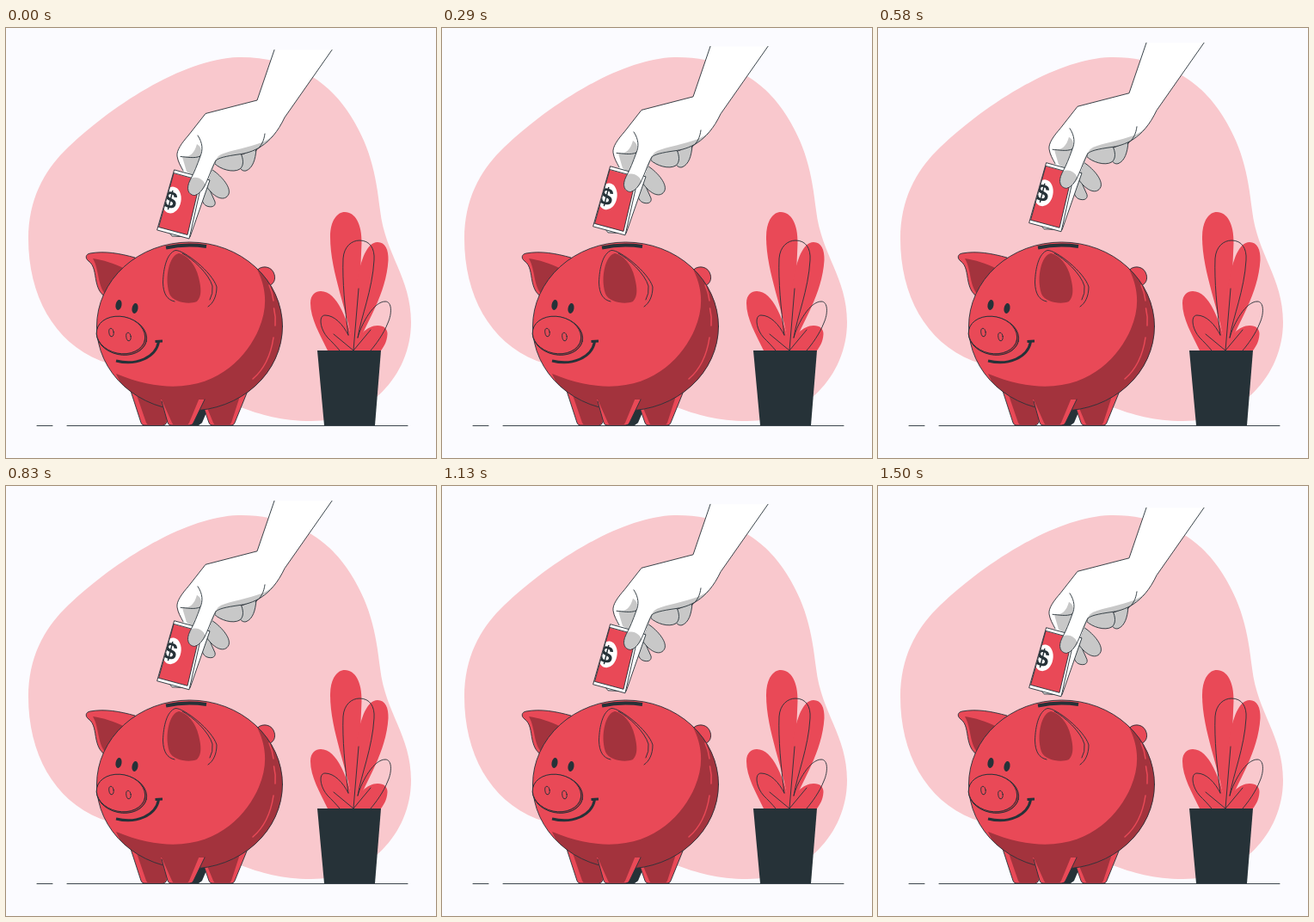
These frames come from a looping animation (500 by 500 pixels, 1540 ms). An HTML page:

```html
<!DOCTYPE html>
<html lang="en">
<head>
<meta charset="utf-8">
<title>Piggy bank</title>
<style>
html, body { margin: 0; width: 100%; height: 100%; overflow: hidden; background: #fbfbff; }
svg { display: block; width: 100vw; height: 100vh; }
.red { fill: #e94957; }
.dark { fill: #a3333d; }
.ink { fill: #263238; }
.white { fill: #fff; }
.grey { fill: #c8c8c8; }
.line { stroke: #263238; stroke-width: .9; stroke-linecap: round; stroke-linejoin: round; }
.open { fill: none; }
</style>
</head>
<body>
<svg viewBox="0 0 500 500">
  <defs>
    <clipPath id="note"><path d="M195 169 226 177.500 211 240.500 177.500 231.500Z"/></clipPath>
    <clipPath id="body"><ellipse cx="213.500" cy="347" rx="108" ry="98"/></clipPath>
  </defs>

  <path fill="#f9c8cd" d="M270 34C330 33 372 60 396 95C424 136 430 170 435 212C441 264 471 290 471 342C471 405 420 457 355 457C320 457 297 450 270 440L110 387C55 365 26 310 26 245C26 200 44 167 68 143C120 92 205 36 270 34Z"/>
  <path class="line open" d="M36 462.500H54M71 462.500H467"/>

  <g id="plant">
    <g class="red">
      <path d="M404 375C398 330 377 285 377 243C377 224 385 214 394 214C406 214 414 228 413.500 250C412 290 410 330 404 375Z"/>
      <path d="M402 375C402 330 408 249 432 249C441 249 445 258 444.500 270C442 310 420 340 406 375Z"/>
      <path d="M374 375C365 356 354 338 354 320C354 310 360 306 366 306C385 306 398 340 406 375Z"/>
      <path d="M402 375C408 358 420 346 432 346C440 346 443.500 350 443.500 356C443 365 439 371 436 375Z"/>
    </g>
    <g class="line open">
      <path d="M398 357C394 325 391 295 392 268C393 254 402 247 411 247C423 247 429 256 428 270C426 305 413 335 409 360M404 375 410 303"/>
      <path d="M409 360C414 342 428 318 441 318C449 318 449 332 444 343C439 356 430 368 424 375"/>
      <path d="M398 357C392 345 382 334 371 334C363 334 365 350 374 360C378 364 384 370 388 375M404 375 381 356M404 375 424 351"/>
    </g>
    <path class="ink" d="M362 375H436L429 462H370Z"/>
  </g>

  <g id="pig">
    <path class="ink" d="M212 440H236L228 459 224 462H214Z"/>
    <path class="red line" d="M145 422 157 459Q158 462 161 462H182Q186 462 187 458L196 430Z"/>
    <path class="dark" d="M151 424 163 459Q164 461.500 167 461.500H182Q185 461.500 186 458L194 430Z"/>
    <path class="red line" d="M226 430 236 459Q237 462 240 462H262Q265 462 266 459L281 422Z"/>
    <path class="dark" d="M229 430 241 459Q242 461.500 244 461.500H258Q261 461.500 262 459L273 425Z"/>
    <path class="red line" d="M291 283C295 276 307 276 311 284C315 292 311 299 304 300L296 296Z"/>
    <path class="red line" d="M150 267C132 262 115 259 98 262C92 263 92 268 96 271C103 276 103 285 105 295C107 304 110 310 118 314Z"/>
    <path class="dark" d="M101 268C113 270 125 273 138 280C128 288 121 298 117 311C106 301 109 282 101 268Z"/>

    <ellipse class="red" cx="213.500" cy="347" rx="108" ry="98"/>
    <path class="dark" clip-path="url(#body)" d="M290 277C303 300 305 324 294 350C276 392 225 442 128 402L150 450H330V270Z"/>
    <ellipse class="line open" cx="213.500" cy="347" rx="108" ry="98"/>
    <path class="open" stroke="#e94957" stroke-width="1.500" stroke-linecap="round" d="M306 299Q310 308 311 317M311.500 326Q314 336 313 346M311 360C308 380 300 397 287 408"/>

    <path class="red" d="M180 432 188 459Q189 462 192 462H213Q217 462 218 459L231 432Z"/>
    <path class="line open" d="M181 434 188 459Q189 462 192 462H213Q217 462 218 459L231 432"/>
    <path class="dark" d="M180 430 193 459Q194 461.500 196 461.500H209Q212 461.500 213 459L225 430Z"/>

    <path class="red" d="M184 311C180 290 186 262 198 258.500C207 258 240 284 245 301C245 312 241 320 235 324L226 320 196 318Z"/>
    <path class="dark" d="M190 309C184 290 190 264 201 262C211 264 221 276 224 290C227 302 228 312 222 318C213 322 194 319 190 309Z"/>
    <path class="line open" d="M196 318C187 316 183 309 182.500 296C183 279 187 262 197 258.500C207 258 240 284 245 301C245 312 241 320 235 324M205 262C217 268 236 286 240 300Q241 309 237 316"/>
    <path class="open" stroke="#263238" stroke-width="4" d="M186 255.500Q209 250.500 233 254"/>

    <ellipse class="ink" cx="131" cy="322" rx="3.500" ry="6" transform="rotate(10 131 322)"/>
    <ellipse class="ink" cx="150" cy="326" rx="3.500" ry="6" transform="rotate(10 150 326)"/>
    <ellipse class="dark line" cx="134.500" cy="358" rx="29.500" ry="22" transform="rotate(12 134.500 358)"/>
    <ellipse class="red line" cx="133.500" cy="357" rx="28.500" ry="21.500" transform="rotate(12 133.500 357)"/>
    <ellipse class="line open" cx="122.500" cy="354" rx="2.700" ry="4.800" transform="rotate(-8 122.500 354)"/>
    <ellipse class="line open" cx="142.500" cy="359" rx="2.700" ry="4.800" transform="rotate(-8 142.500 359)"/>
    <path class="open" stroke="#263238" stroke-width="3" d="M128 387C152 393 174 383 177.500 365M173.500 364.500 182 364"/>
  </g>

  <g id="hand">
    <g class="grey line">
      <path d="M268 150C270 163 274 167 279 166C287 163 290 153 291 141Z"/>
      <path d="M243 158C249 164 264 169 272 164C277 160 276 152 273 146L246 148Z"/>
      <path d="M226 192C228 201 229 206 235 207.500C241 209 244 206 243 202L235 184Z"/>
      <path d="M240 165C248 170 262 184 259 193C255 202 243 199 233 184Z"/>
    </g>
    <path class="white line" d="M207 168 237 177 214 243 193 242 190 238Z"/>
    <path class="white" d="M312 25.500 292 84 232 99.500 212 125C205 133 198 142 199 149L206 168 219 172 236 176 244 154C247 151 256 149 270 147C286 145 308 138 324 104L379 25.500Z"/>
    <path class="grey" d="M325 102C315 122 308 129 298 133C282 139 262 142 250 147C244 151 240 160 238 171L244 154C247 151 256 149 270 147C286 145 308 138 325 102Z"/>
    <path class="grey" d="M222 135C230 140 227 147 222 159L217 171 210 167 205 150C214 150 219 146 222 135Z"/>
    <path class="line open" d="M312 25.500 292 84 232 99.500 212 125C205 133 198 142 199 149C200 156 203 160 206 166M223 125C229 134 229 142 226 149C219 152 211 150 203 149.500M244 154C247 151 256 149 270 147C286 145 308 138 324 104L379 25.500M290 143C297 138 300 131 301 123"/>

    <path class="white line" d="M196 165 229 174 213 245 176 235Z"/>
    <g clip-path="url(#note)">
      <path class="red" d="M170 160H240V250H170Z"/>
      <ellipse class="white" cx="192.500" cy="200" rx="11" ry="15.500" transform="rotate(10 192.500 200)"/>
      <text class="ink" x="191" y="209.500" font-family="Arial, 'Liberation Sans', sans-serif" font-size="28" font-weight="700" text-anchor="middle" transform="rotate(14 191 200)">$</text>
    </g>
    <path class="line open" d="M195 169 177.500 231.500 211 240.500 226 177.500Z"/>

    <path class="white" d="M227 148C222 160 219 168 214 177C209 187 212 194 219 194.500C231 192 234 174 244 154Z"/>
    <path class="grey" d="M215 175C222 171 231 177 232 183C228 191 219 196 213.500 192C210 188 212 181 215 175ZM249 147C242 153 238 164 234 178Q239 163 244 154Z"/>
    <path class="line open" d="M226 149C222 160 219 168 214 177C209 187 212 194 219 194.500C231 192 234 174 244 154"/>
  </g>
</svg>
<script>
const LOOP = 1540, STEP = 1000 / 24;
// [step, vertical offset]
const lift = [[0, 0], [17, -10], [20, -8.2], [27, -4.2], [36, -0.2]];
const hand = document.getElementById('hand');

function offset(step) {
  let i = 1;
  while (i < lift.length - 1 && step > lift[i][0]) i++;
  const [s0, y0] = lift[i - 1], [s1, y1] = lift[i];
  return y0 + (y1 - y0) * (step - s0) / (s1 - s0);
}

function draw() {
  const t = performance.now() % LOOP;
  const step = Math.min(36, Math.floor((t + 4.5) / STEP));
  hand.setAttribute('transform', `translate(0 ${offset(step).toFixed(2)})`);
  requestAnimationFrame(draw);
}
draw();
</script>
</body>
</html>
```
